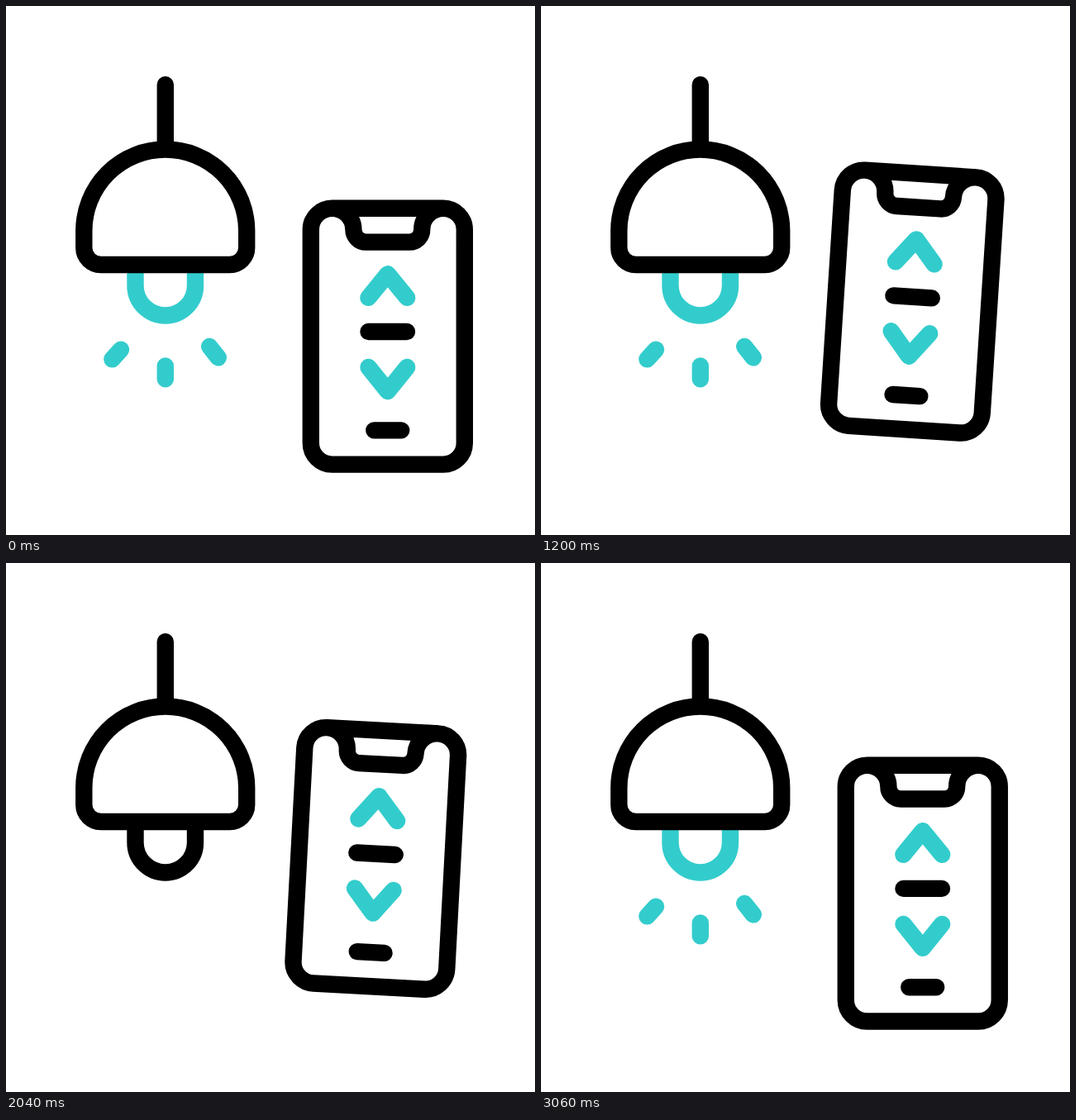
An HTML page for the animation above (3080 ms loop, 640 by 640 pixels).

```html
<!DOCTYPE html>
<html lang="en">
<head>
<meta charset="utf-8">
<title>Smart lamp</title>
<style>
html, body { margin: 0; height: 100%; overflow: hidden; background: #fff; }
svg { display: block; width: 100%; height: 100%; }
path { fill: none; stroke: #000; stroke-width: 20.4; stroke-linecap: round; stroke-linejoin: round; }
.teal { stroke: #33cccc; }
</style>
</head>
<body>
<svg viewBox="0 0 640 640">
  <path id="bulb" d="M156.5 316V338.2a36.2 36.2 0 0 0 72.5 0V316" style="stroke-linecap:butt"/>
  <path d="M192.8 95.3V173M94.3 272A98.4 98.4 0 0 1 291.2 272V292.5a20.5 20.5 0 0 1-20.5 20.5H114.8a20.5 20.5 0 0 1-20.5-20.5Z"/>
  <path id="rays" class="teal"/>
  <path id="ticks" class="teal"/>
  <g id="phone">
    <path d="M394.6 244.8H529a25.8 25.8 0 0 1 25.8 25.8V528.8a25.8 25.8 0 0 1-25.8 25.8H394.6a25.8 25.8 0 0 1-25.8-25.8V270.6a25.8 25.8 0 0 1 25.8-25.8a25.8 25.8 0 0 1 25.8 25.8a15 15 0 0 0 15 15H488.2a15 15 0 0 0 15-15a25.8 25.8 0 0 1 25.8-25.8"/>
    <path d="M438.5 394H485M445.3 513.4H478.2"/>
    <path id="up" class="teal"/>
    <path class="teal" d="M438.5 437L461.8 466L485.2 437"/>
  </g>
</svg>
<script>
const LOOP = 3080;
const el = id => document.getElementById(id);

// Eased value from a flat list of time, value pairs
function track(t, ...keys) {
  if (t <= keys[0]) return keys[1];
  for (let i = 2; i < keys.length; i += 2) {
    if (t < keys[i]) {
      const u = (t - keys[i - 2]) / (keys[i] - keys[i - 2]);
      return keys[i - 1] + (keys[i + 1] - keys[i - 1]) * u * u * (3 - 2 * u);
    }
  }
  return keys[keys.length - 1];
}

// Part of each line [x, y, dx, dy] between two fractions
function trim(lines, from, to) {
  if (to - from < 0.01) return "";
  return lines.map(([x, y, dx, dy]) =>
    `M${x + dx * from} ${y + dy * from}L${x + dx * to} ${y + dy * to}`).join("");
}

const rays = [[139, 415.6, -10.6, 11.8], [192.8, 435.4, 0, 16], [246.2, 412, 10.6, 13.4]];
const ticks = [[306, 199.7, -13.4, -14.4], [329.9, 176, -8, -15]];

function draw(t) {
  const x = track(t, 260, 0, 760, -24, 2240, -24, LOOP, 0);
  const y = track(t, 0, 0, 720, -42.5, 2360, -42.5, LOOP, 0);
  const angle = track(t, 0, 0, 300, -5.4, 880, 3.75, 1180, 3.75, 1570, -2.7, 2160, 3.75, 2920, 0);
  el("phone").setAttribute("transform", `translate(${x} ${y}) rotate(${angle} 461.8 577.5)`);

  const size = track(t, 1320, 1, 1500, 0.53, 1680, 1);
  const w = 23.4 * size, h = 14.3 * size;
  el("up").setAttribute("d", `M${461.8 - w} ${338.6 + h}L461.8 ${338.6 - h}L${461.8 + w} ${338.6 + h}`);

  const lit = track(t, 1400, 1, 1500, 0, 2840, 0, 2960, 1);
  el("bulb").style.stroke = `rgb(${51 * lit},${204 * lit},${204 * lit})`;

  const tail = t < 2000 ? track(t, 1480, 0, 1760, 1) : 0;
  const head = t < 2000 ? 1 : track(t, 2840, 0, 3050, 1);
  el("rays").setAttribute("d", trim(rays, tail, head));
  el("ticks").setAttribute("d", trim(ticks, track(t, 1520, 0, 1680, 1), track(t, 1440, 0, 1600, 1)));
}

let start;
function tick(now) {
  start ??= now;
  draw((now - start) % LOOP);
  requestAnimationFrame(tick);
}
draw(0);
requestAnimationFrame(tick);
</script>
</body>
</html>
```
